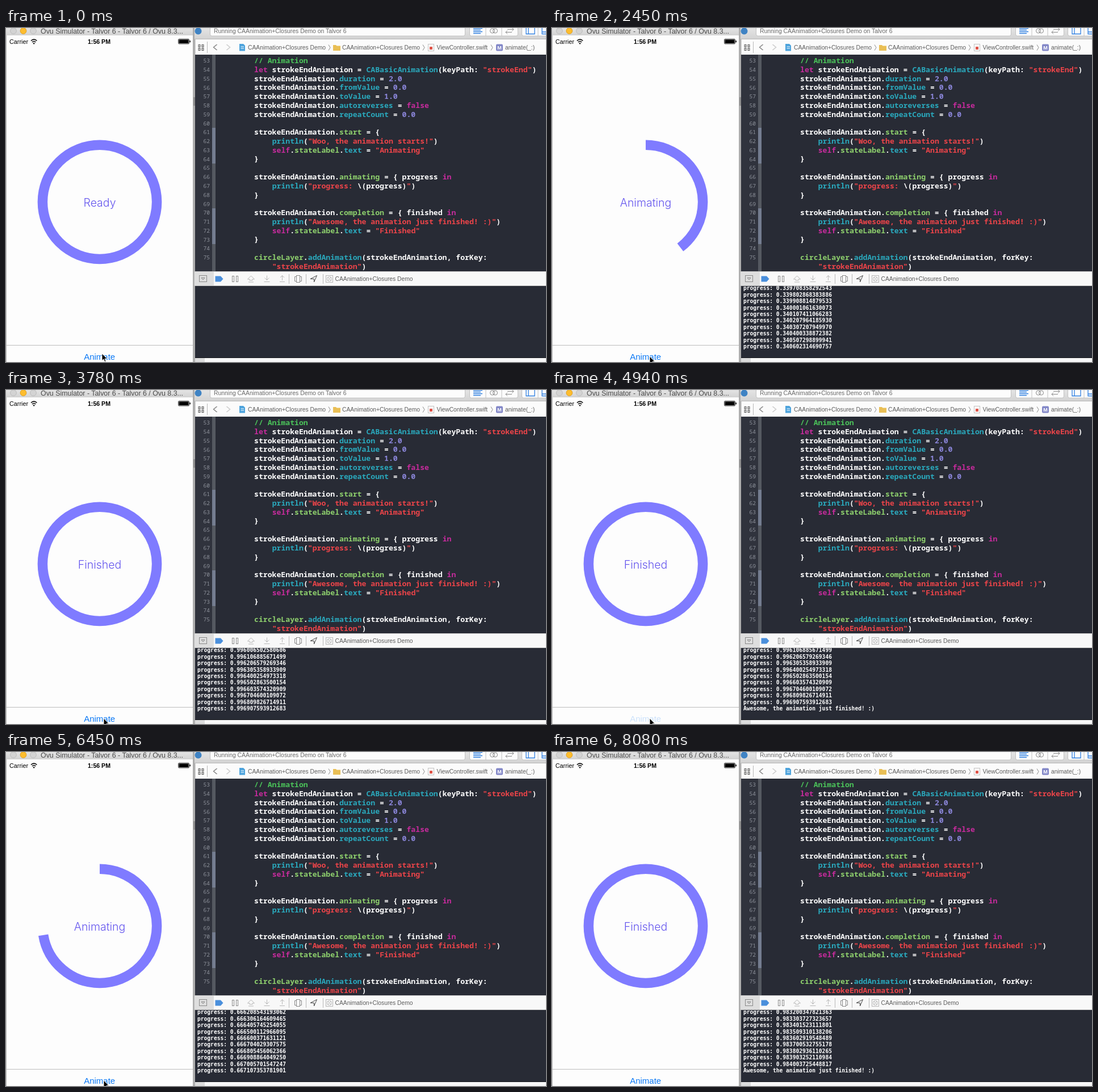
An HTML page that plays this animation: 951 px wide and 589 px high, repeating every 8520 ms.

```html
<!DOCTYPE html>
<html lang="en">
<head>
<meta charset="utf-8">
<title>Stroke animation demo</title>
<style>
  html, body { margin: 0; width: 100%; height: 100%; overflow: hidden; background: #fdfdfd; }
  svg { display: block; }
  text { white-space: pre; font-family: "Liberation Sans", Arial, sans-serif; }
  .code text { font: 600 13.17px "Noto Sans Mono", monospace; fill: #fff; }
  .gutter text { font: 9.6px "Noto Sans Mono", monospace; fill: #8e929b; text-anchor: end; }
  .console text { font: bold 9.6px "DejaVu Sans Mono", monospace; fill: #fff; }
  .crumbs text { font-size: 10.3px; fill: #5c5c5c; }
  .line { fill: none; stroke: #8a8a8a; }
  .pale { stroke: #b8b8b8; }
  .blue { fill: none; stroke: #2f7fe0; stroke-width: 1.3; }
  .button { fill: #fcfcfc; stroke: #c2c2c2; }
  #label { font: 300 19.5px Inter, sans-serif; fill: #6455ee; text-anchor: middle; }
</style>
</head>
<body>
<svg width="951" height="589" viewBox="0 0 951 589">
  <defs>
    <linearGradient id="bar" x2="0" y2="1"><stop stop-color="#e4e4e4"/><stop offset="1" stop-color="#d2d2d2"/></linearGradient>
    <clipPath id="consoleClip"><rect x="333" y="455" width="618" height="126"/></clipPath>
    <circle id="light" cy="5" r="5.4"/>
    <path id="chevron" class="line" d="M-3 -5L0 0L-3 5"/>
    <path id="step" class="line pale" d="M0 -6V2M-4 -2L0 2L4 -2M-5 5H5"/>
    <path id="swap" class="line" d="M-7 0H4M1 -3L4 0L1 3"/>
  </defs>

  <!-- Phone window -->
  <rect width="330" height="13" fill="url(#bar)"/>
  <rect y="13" width="330" height="576" fill="#fdfdfd"/>
  <path d="M.5 13V589" stroke="#b8b8b8"/>
  <use href="#light" x="13" fill="#d3d3d3" stroke="#bcbcbc"/>
  <use href="#light" x="30.5" fill="#fdbd2e" stroke="#dfa023"/>
  <use href="#light" x="48" fill="#d3d3d3" stroke="#bcbcbc"/>
  <text x="61" y="9.6" font-size="12.4" fill="#4b4b4b">Ovu Simulator - Talvor 6 - Talvor 6 / Ovu 8.3...</text>
  <text x="6" y="27.5" font-size="10.8">Carrier</text>
  <g fill="none" stroke="#000" stroke-width="1.6">
    <path d="M44 22.5Q49.200 17.800 54.400 22.5M46 25Q49.200 22 52.400 25"/>
    <circle cx="49.2" cy="27.200" r=".5"/>
  </g>
  <text x="164" y="27.5" font-size="10.6" font-weight="bold" text-anchor="middle">1:56 PM</text>
  <rect x="303.5" y="19.5" width="19" height="8.500" rx="1.500" fill="none" stroke="#000" stroke-width=".8"/>
  <rect x="304.5" y="20.5" width="17" height="6.500" rx=".5"/>
  <rect x="323.500" y="22" width="1.500" height="3.500" rx=".7"/>
  <circle id="ring" cx="165" cy="306.800" r="100.600" pathLength="1" fill="none" stroke="#7f7bff"
    stroke-width="17.5" transform="rotate(-90 165 306.800)"/>
  <text id="label" x="165" y="314.600"></text>
  <path d="M1 559.500H329" stroke="#bdbdbd"/>
  <text id="button" x="164.700" y="585.300" font-size="15" fill="#0a78f5" text-anchor="middle">Animate</text>

  <!-- Editor toolbar -->
  <rect x="329" width="4" height="589" fill="#aeaeae"/>
  <rect x="330" y="122" width="3" height="15" fill="#8e8e8e"/>
  <rect x="332" width="619" height="20" fill="url(#bar)"/>
  <circle cx="338.500" cy="5.500" r="6" fill="#3f83c4"/>
  <rect class="button" x="359.500" y="-5" width="449" height="19" rx="3"/>
  <text x="366" y="9" font-size="10.4" fill="#6a6a6a">Running CAAnimation+Closures Demo on Talvor 6</text>
  <rect class="button" x="816.500" y="-5" width="85" height="19" rx="3"/>
  <rect class="button" x="908.500" y="-5" width="60" height="19" rx="3"/>
  <path class="button" d="M845 0V14M873 0V14M937 0V14"/>
  <path class="blue" d="M823 .5H839M823 3.500H836M823 6.500H839M823 9.500H836"/>
  <circle class="line" cx="856.500" cy="5" r="4"/>
  <circle class="line" cx="861.500" cy="5" r="4"/>
  <use href="#swap" x="890" y="2.500"/>
  <use href="#swap" transform="translate(884 7.500) scale(-1 1)"/>
  <path class="blue" d="M916 -1H931V10.500H916ZM920 -1V10.500M944 -1H958V10.500H944ZM944 7H958"/>

  <!-- Jump bar -->
  <rect x="333" y="19.500" width="619" height="28" fill="#fbfbfb" stroke="#b6b6b6"/>
  <g class="crumbs">
    <path d="M340.500 29V40M346.500 29V40" stroke="#666" stroke-width="4" stroke-dasharray="5 1"/>
    <path d="M340.500 30.500V39M346.500 30.500V39" stroke="#fbfbfb" stroke-width="2" stroke-dasharray="2 4"/>
    <path class="line pale" d="M354.500 24V44"/>
    <use href="#chevron" transform="translate(365.500 34) scale(-2 1)"/>
    <use href="#chevron" transform="translate(394.500 34) scale(2 1)" opacity=".4"/>
    <use href="#chevron" x="571" y="34.500"/>
    <use href="#chevron" x="737" y="34.500"/>
    <use href="#chevron" x="857" y="34.500"/>
    <path d="M411 28H418L421 31V40.500H411Z" fill="#4da3dc"/>
    <path d="M413.500 33H419M413.500 36H419" stroke="#fff"/>
    <path d="M576 30H581L582.500 31.500H589V40H576Z" fill="#e9bf55"/>
    <rect class="button" x="743.500" y="28.500" width="10" height="12"/>
    <rect x="746" y="33" width="5" height="5" fill="#e0564a"/>
    <rect x="863" y="28.500" width="12" height="12" rx="2" fill="#8388c8"/>
    <text x="869" y="38" text-anchor="middle" font-weight="bold" style="font-size:9px;fill:#fff">M</text>
    <text x="426" y="38">CAAnimation+Closures Demo</text>
    <text x="592" y="38">CAAnimation+Closures Demo</text>
    <text x="758.500" y="38">ViewController.swift</text>
    <text x="879" y="38">animate(_:)</text>
  </g>

  <!-- Code -->
  <rect x="333" y="47" width="618" height="382" fill="#282b35"/>
  <rect x="333" y="47" width="30" height="382" fill="#30333d"/>
  <rect x="363" y="47" width="6" height="382" fill="#555961"/>
  <path d="M366 176V239M366 318V381" stroke="#747d90" stroke-width="6"/>
  <g class="gutter" id="gutter"></g>
  <g class="code" id="code"></g>

  <!-- Debug bar -->
  <rect x="332" y="429.500" width="620" height="25" fill="#f8f8f8" stroke="#c6c6c6"/>
  <rect x="333" y="430" width="33" height="24" fill="#dedede"/>
  <path d="M368.500 437.500H378L382.500 442.500L378 447.500H368.500Z" fill="#4a8fdc"/>
  <g class="line">
    <rect x="340.500" y="436.500" width="13" height="11"/>
    <path d="M344 440.500H350L347 444Z"/>
    <rect x="398.500" y="437.500" width="3" height="10"/>
    <rect x="405.500" y="437.500" width="3" height="10"/>
    <path class="pale" d="M425.500 443L431.500 437L437.500 443H434V445H429V443ZM427 448H436"/>
    <use href="#step" x="459.500" y="442.500"/>
    <use href="#step" transform="translate(486.500 438.500) scale(1 -1)" opacity="0"/>
    <path class="pale" d="M486.500 445V437M483 440L486.500 436.500L490 440M482 447.500H491"/>
    <path class="pale" d="M498.500 434V451M528.500 434V451M558.500 434V451"/>
    <rect x="511.500" y="436.500" width="6" height="12"/>
    <path d="M511 438.500H508.500V446.500H511M518 438.500H520.500V446.500H518"/>
    <path d="M536 442.500L547.500 436.500L542.500 448V442.500Z" stroke="#444"/>
    <rect class="pale" x="563.500" y="436.500" width="12" height="12"/>
    <circle class="pale" cx="569.500" cy="442.500" r="4"/>
    <path class="pale" d="M566.500 439.500L572.500 445.500M572.500 439.500L566.500 445.500"/>
  </g>
  <g class="crumbs"><text x="579.500" y="446">CAAnimation+Closures Demo</text></g>

  <!-- Console -->
  <rect x="333" y="455" width="618" height="126" fill="#282b35"/>
  <g class="console" id="console" clip-path="url(#consoleClip)"></g>
  <rect x="333" y="581" width="618" height="8" fill="#f7f7f7"/>
  <path d="M333 581.500H951" stroke="#15161b"/>
  <rect x="333" y="582" width="17" height="7" fill="#dcdcdc"/>

  <path id="cursor" d="M0 0V12.600L2.900 9.900L4.900 14.600L7 13.700L5 9.200H9Z" stroke="#fff" stroke-width=".9"/>
</svg>
<script>
const LOOP = 8520;
const $ = id => document.getElementById(id);
const clamp = v => Math.min(1, Math.max(0, v));

function add(parent, tag, attrs, text = "") {
  const el = document.createElementNS("http://www.w3.org/2000/svg", tag);
  for (const name in attrs) el.setAttribute(name, attrs[name]);
  el.textContent = text;
  return parent.appendChild(el);
}

// Source listing with simple highlighting
const source = String.raw`// Animation
let strokeEndAnimation = CABasicAnimation(keyPath: "strokeEnd")
strokeEndAnimation.duration = 2.0
strokeEndAnimation.fromValue = 0.0
strokeEndAnimation.toValue = 1.0
strokeEndAnimation.autoreverses = false
strokeEndAnimation.repeatCount = 0.0

strokeEndAnimation.start = {
    println("Woo, the animation starts!")
    self.stateLabel.text = "Animating"
}

strokeEndAnimation.animating = { progress in
    println("progress: \(progress)")
}

strokeEndAnimation.completion = { finished in
    println("Awesome, the animation just finished! :)")
    self.stateLabel.text = "Finished"
}

circleLayer.addAnimation(strokeEndAnimation, forKey:
    "strokeEndAnimation")`.split("\n");

const token = /\/\/.*|"(?=\)$)|"[^"\\]*"?|\\\(\w+\)|\d\.\d|\w+|[^\w"\\]/g;
const palette = [
  [/^\/\//, "#4bc45a"],
  [/^"/, "#ec4449"],
  [/^\d/, "#8b86da"],
  [/^(let|false|in|self)$/, "#c72b9d"],
  [/^(CABasicAnimation|duration|fromValue|toValue|autoreverses|repeatCount|println|text|addAnimation)$/, "#2aa9bd"],
  [/^(start|animating|completion|stateLabel|circleLayer)$/, "#8ed06d"],
];
source.forEach((line, i) => {
  const y = 62 + i * 15.77;
  const row = add($("code"), "text", { x: 437, y });
  for (const word of line.match(token) || []) {
    const rule = palette.find(([pattern]) => pattern.test(word));
    add(row, "tspan", { fill: rule ? rule[1] : "#fff" }, word);
  }
  if (i < 23) add($("gutter"), "text", { x: 359, y: y - 0.8 }, 53 + i);
});

// The two clicks on the button; `logged` is the last progress value printed
const runs = [
  { press: 1550, start: 1670, length: 1970, logged: 0.9969 },
  { press: 4940, start: 5060, length: 1920, logged: 0.984 },
];
const LOG_LAG = 110;

// Pointer stops: [time, x, y]
const pointer = [
  [150, 169, 574], [260, 160, 546], [440, 203, 508], [500, 198, 521], [640, 198, 521], [1140, 172, 579],
  [7430, 172, 579], [7600, 340, 526], [7840, 878, 557], [7960, 878, 557], [8080, 905, 605],
];
function pointerAt(t) {
  const next = pointer.findIndex(stop => stop[0] > t);
  if (next < 1) return pointer.at(next).slice(1);
  const [from, to] = [pointer[next - 1], pointer[next]];
  const k = (t - from[0]) / (to[0] - from[0]);
  return [1, 2].map(i => from[i] + (to[i] - from[i]) * k);
}

const noise = n => { const s = Math.sin(n * 12.9898) * 43758.5453; return s - Math.floor(s); };
const logLine = n => "progress: " + ((n + noise(n) * 0.1) / 1e4).toFixed(15);

function logLines(t) {
  const run = runs.findLast(r => t > r.start + LOG_LAG);
  if (!run) return [];
  const elapsed = t - run.start - LOG_LAG;
  const done = elapsed > run.length + 40;
  const last = Math.floor(Math.min(elapsed / run.length, run.logged) * 1e4);
  const count = done ? 9 : 10;
  const lines = Array.from({ length: count }, (_, i) => logLine(last - count + 1 + i));
  return done ? [...lines, "Awesome, the animation just finished! :)"] : lines;
}
const rows = Array.from({ length: 10 }, (_, i) =>
  add($("console"), "text", { x: 337, y: 462.3 + i * 11.4 }));

function draw(t) {
  const run = runs.findLast(r => t >= r.press);
  const playing = run && t >= run.start;
  const part = playing ? clamp((t - run.start) / run.length) : 1;

  $("ring").setAttribute("stroke-dasharray", part < 1 ? `${part} 2` : "none");
  $("ring").setAttribute("visibility", part > 0 ? "visible" : "hidden");
  $("button").setAttribute("opacity", run ? 0.2 + 0.8 * clamp((t - run.start) / 380) : 1);

  const animating = playing && t >= run.start + 60 && t < run.start + run.length + 60;
  const first = !run || (run === runs[0] && t < run.start + 60);
  $("label").textContent = first ? "Ready" : animating ? "Animating" : "Finished";

  const lines = logLines(t);
  rows.forEach((row, i) => { row.textContent = lines[i] || ""; });
  $("cursor").setAttribute("transform", `translate(${pointerAt(t)})`);
}

const start = performance.now();
function frame() {
  draw((performance.now() - start) % LOOP);
  requestAnimationFrame(frame);
}
frame();
</script>
</body>
</html>
```
